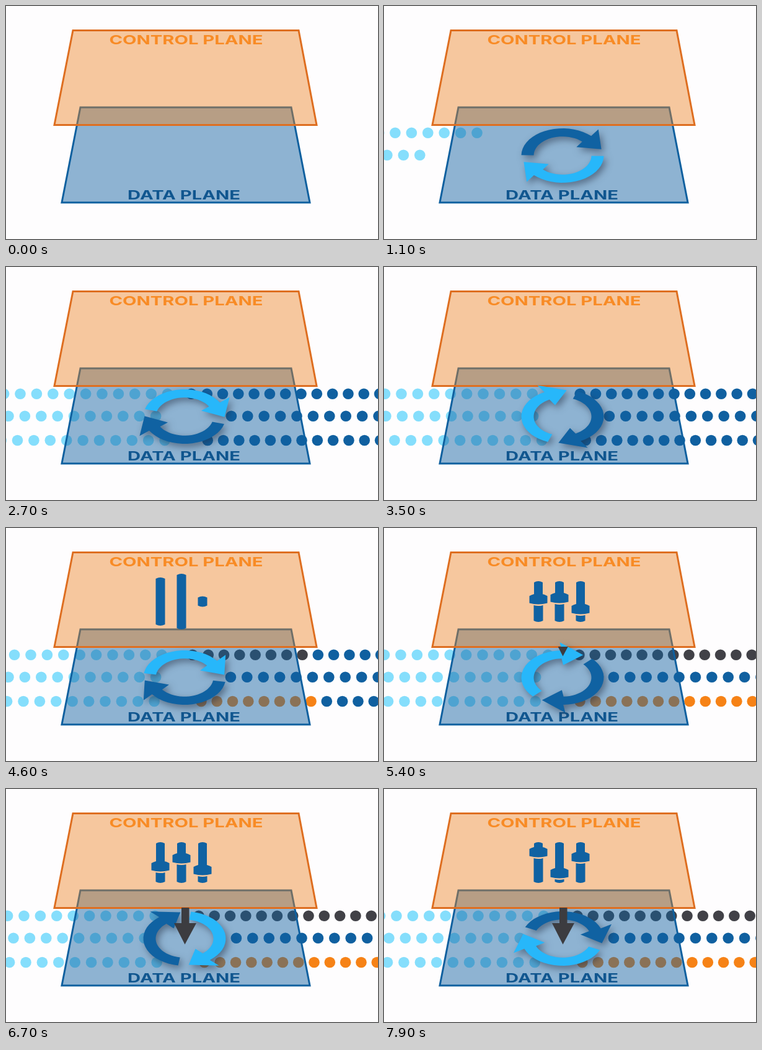
An HTML page for the animation above (8000 ms loop, 600 px wide and 377 px high).

```html
<!DOCTYPE html>
<html lang="en">
<head>
<meta charset="utf-8">
<title>Control plane and data plane</title>
<style>
  html, body { margin: 0; width: 100%; height: 100%; overflow: hidden; background: #fefdfe; }
  svg { display: block; width: 100vw; height: 100vh; }
  text { font: 700 29.2px Inter, "Open Sans", sans-serif; text-anchor: middle; }
  #ring { filter: drop-shadow(4px 5px 6px rgba(30, 40, 60, .5)); }
</style>
</head>
<body>
<svg viewBox="0 0 600 377">
  <defs>
    <clipPath id="below"><rect x="250" y="192" width="80" height="90"/></clipPath>
  </defs>
  <g id="dots"></g>
  <path d="M120 164H460L490 318H90Z" fill="rgba(16,96,160,.47)" stroke="#0f609f" stroke-width="3"/>
  <text transform="translate(287 312.5) scale(1 .68)" fill="#10568f">DATA PLANE</text>
  <path d="M108 39.500H472L501 192.500H78Z" fill="rgba(234,130,34,.44)" stroke="#de6e20" stroke-width="3"/>
  <text transform="translate(290.5 62) scale(1 .71)" fill="#f88b25">CONTROL PLANE</text>
  <path id="sliders" fill="#1062a2"/>
  <g id="ring">
    <path id="light" fill="#27b7fa"/>
    <path id="dark" fill="#1062a2"/>
  </g>
  <g clip-path="url(#below)">
    <path id="pointer" d="M283 188H295.500V217H307L288.500 251.500L271 217H283Z" fill="#3c3c40"/>
  </g>
</svg>
<script>
const LOOP = 8000, STEP = 100;
const GAP = 26.4, TIGHT = 25.3, DOT = 8.8, FLOW = 0.53;
const PALE = '#85defc', BLUE = '#1060a0';
const $ = id => document.getElementById(id);

const clamp = (v, a = 0, b = 1) => Math.min(b, Math.max(a, v));
const smooth = u => u * u * (3 - 2 * u);
const easeOut = u => 1 - (1 - u) ** 2;

// Value of a track at time t; times and values are parallel lists.
function track(times, values, t, ease = u => u) {
  if (t <= times[0]) return values[0];
  const i = times.findIndex(x => x > t);
  if (i < 0) return values[values.length - 1];
  const u = (t - times[i - 1]) / (times[i] - times[i - 1]);
  return values[i - 1] + (values[i] - values[i - 1]) * ease(u);
}

const BEATS = [1900, 3500, 4600, 5400, 6700, 7900];

// inX / outX: drift of the dot grid before and after the ring.
const ROWS = [
  { y: 205.3, head: 590, pale: 265, blue: 297, gap: TIGHT, tint: '#414147', tintHead: 482,
    inX: [18, 28, 40, 27, 29, 20], outX: [484, 468, 478, 492, 488, 489] },
  { y: 241.3, head: 498, pale: 245, blue: 345, gap: GAP,
    inX: [5, 3, 4, 7, 12, 8], outX: [469, 469, 468, 476, 477, 476] },
  { y: 280.5, head: 256, pale: 265, blue: 302, gap: TIGHT, tint: '#f68216', tintHead: 495,
    inX: [20, 17, 28, 33, 32, 32], outX: [477, 477, 492, 493, 497, 497] }
];

function drawDots(t) {
  let out = '';
  for (const row of ROWS) {
    const head = row.head + (t - 1900) * FLOW;
    const tintHead = row.tint ? row.tintHead + (t - 4600) * FLOW : 0;
    const line = (anchor, gap, from, to, color) => {
      const first = anchor - Math.floor((anchor - from) / gap) * gap;
      for (let x = first; x <= Math.min(to, head); x += gap)
        out += `<circle cx="${x.toFixed(1)}" cy="${row.y}" r="${DOT}" fill="${color(x)}"/>`;
    };
    line(track(BEATS, row.inX, t), GAP, -12, row.pale, () => PALE);
    line(track(BEATS, row.outX, t), row.gap, row.blue, 612, x => x <= tintHead ? row.tint : BLUE);
  }
  $('dots').innerHTML = out;
}

// A curved arrow on a tilted disc; its tip lies at the given angle in degrees.
function arrowPath(tip, scale) {
  const pts = [];
  const add = (r, deg) => {
    const a = (tip + deg) * Math.PI / 180;
    pts.push((288 + 66.5 * scale * r * Math.cos(a)).toFixed(1) + ' ' +
             (242 + 44 * scale * r * Math.sin(a)).toFixed(1));
  };
  for (let d = -165; d <= -32; d += 7) add(1, d);
  add(1.3, -34);
  add(0.97, 0);
  add(0.46, -29);
  for (let d = -33; d >= -165; d -= 6) add(0.7, d);
  return 'M' + pts.join('L') + 'Z';
}

function drawRing(t) {
  const angle = t < 1900 ? 86 + (t - 1900) * 0.35
                         : track(BEATS, [86, 636, 1074, 1381, 1884, 2350], t);
  const scale = track([100, 500, 700], [0, 1.08, 1], t, easeOut);
  $('ring').style.display = scale > 0 ? '' : 'none';
  $('light').setAttribute('d', arrowPath(angle, scale));
  $('dark').setAttribute('d', arrowPath(angle + 180, scale));
}

// Short cylinder seen from above; a negative bulge hollows its top edge.
const cylinder = (x, w, top, bottom, bulge = 4) =>
  bottom - top < 2 ? '' :
  `M${x - w / 2} ${top + bulge / 2}q${w / 2} ${-bulge} ${w} 0V${bottom - 2}q${-w / 2} 4 ${-w} 0Z`;

const SLIDERS = [
  { x: 249, start: 4100, knob: [115, 125, 102] },
  { x: 283, start: 4300, knob: [113, 112, 136] },
  { x: 317, start: 4500, knob: [131, 131, 110] }
];

function drawSliders(t) {
  let d = '';
  for (const { x, start, knob } of SLIDERS) {
    const stretch = track([0, 100, 300, 500, 800], [0, 0.26, 1.36, 1.18, 1], t - start);
    const top = 119 - 33 * stretch, bottom = 119 + 33 * stretch;
    const grow = easeOut(clamp((t - 4900) / 300));
    if (!grow) {
      d += cylinder(x, 15, top, bottom);
      continue;
    }
    const y = track([5400, 6700, 7900], knob, t, smooth);
    d += cylinder(x, 14, top, y) +
         cylinder(x, 14 + 15 * grow, y - 9 * grow, y + 8.5 * grow, 8) +
         cylinder(x, 15, y + 11 * grow, bottom, -2);
  }
  $('sliders').setAttribute('d', d);
}

function drawPointer(t) {
  const y = track([5300, 5400, 5800], [-62, -44, 0], t, easeOut);
  $('pointer').setAttribute('transform', `translate(0 ${y})`);
}

let origin, shown;
function tick(now) {
  origin ??= now;
  const t = Math.floor((now - origin) % LOOP / STEP) * STEP;
  if (t !== shown) {
    shown = t;
    [drawDots, drawRing, drawSliders, drawPointer].forEach(draw => draw(t));
  }
  requestAnimationFrame(tick);
}
requestAnimationFrame(tick);
</script>
</body>
</html>
```
